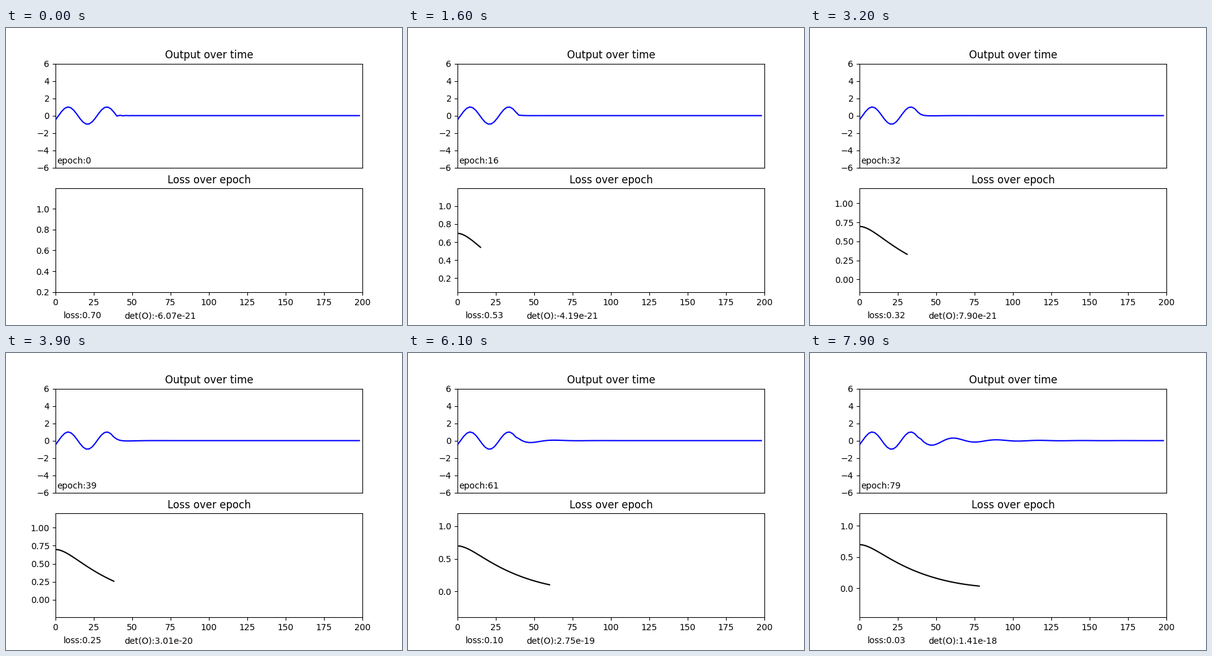
A matplotlib script for the animation above (8000 ms loop, 640 px wide and 480 px high).

```python
import numpy as np
import matplotlib.pyplot as plt
from matplotlib.animation import FuncAnimation

EPOCHS = 80
INTERVAL = 100
WARMUP = 20          # samples driven by the teacher signal

KEYS = [0, 16, 25, 39, 52, 70, 79]
# Free-running response at the key epochs
AMP = [0, .02, .05, .20, .38, .63, .72]
DAMP = [.2, .2, .19, .17, .12, .07, .041]
FREQ = [.16, .16, .16, .17, .19, .217, .224]
ZERO = [43, 43, 43, 42.7, 42.4, 41.5, 40.8]
KICK = [-.05, .045, .08, .08, .04, .02, .06]
RATIO = [-.6, .4, .15, .15, .15, .15, .15]
DET = [-6.07e-21, -4.19e-21, 1.97e-21, 3.01e-20, 1.15e-19, 6.56e-19, 1.41e-18]
DET_UNIT = 1e-21

k = np.arange(100)
time = 2 * k
teacher = np.sin(0.5 * (k - 1))


def at(epoch, values):
    return np.interp(epoch, KEYS, values)


def output(epoch):
    amp, damp, freq, zero, kick, ratio = (
        at(epoch, v) for v in (AMP, DAMP, FREQ, ZERO, KICK, RATIO))
    t = time[WARMUP:]
    free = -amp * np.exp(-damp * (t - t[0])) * np.sin(freq * (t - zero))
    free += kick * ratio ** np.arange(len(t))
    return np.concatenate([teacher[:WARMUP], free])


def det(epoch):
    return DET_UNIT * np.sinh(at(epoch, np.arcsinh(np.array(DET) / DET_UNIT)))


steps = np.arange(EPOCHS)
loss = 0.697 * np.exp(-0.0313 * (steps - 8.5 * (1 - np.exp(-steps / 8.5)))
                      - 1.95e-7 * steps ** 3.5)

fig, (top, low) = plt.subplots(2, 1, figsize=(6.4, 4.8), dpi=100)

top.set_title("Output over time")
top.set_xlim(0, 200)
top.set_ylim(-6, 6)
top.set_xticks([])
wave, = top.plot([], [], "b")
epoch_text = top.text(1, -5.5, "")

low.set_title("Loss over epoch")
low.set_xlim(0, 200)
curve, = low.plot([], [], "k")
loss_text = low.text(5 / 200, -0.25, "", transform=low.transAxes)
det_text = low.text(45 / 200, -0.25, "", transform=low.transAxes)


def update(epoch):
    wave.set_data(time, output(epoch))
    curve.set_data(steps[:epoch], loss[:epoch])
    seen = loss[:max(epoch, 1)]
    low.set_ylim(seen.min() - 0.5, seen.max() + 0.5)
    epoch_text.set_text(f"epoch:{epoch}")
    loss_text.set_text(f"loss:{loss[epoch]:.2f}")
    det_text.set_text(f"det(O):{det(epoch):.2e}")
    return wave, curve, epoch_text, loss_text, det_text


anim = FuncAnimation(fig, update, frames=EPOCHS, interval=INTERVAL,
                     repeat=True, repeat_delay=0, blit=False)
plt.show()
```
